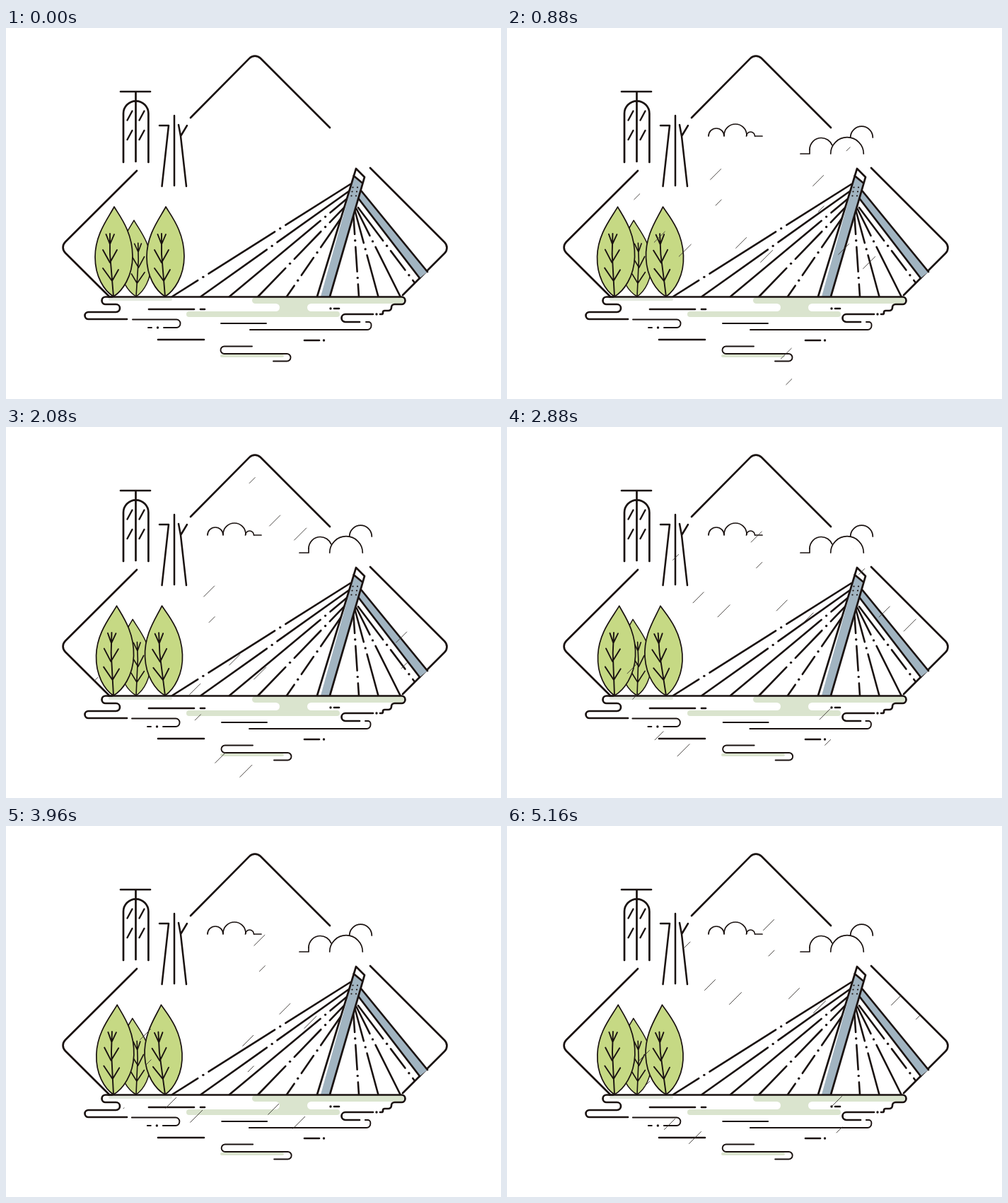
Recreate the animation shown at these times as an HTML page with a canvas. Size 700 by 525 pixels, loop 5200 ms.

```html
<!DOCTYPE html>
<html lang="en">
<head>
<meta charset="utf-8">
<title>Bridge in the rain</title>
<style>
html, body { margin: 0; width: 100%; height: 100%; overflow: hidden; background: #fff; }
canvas { display: block; width: 700px; height: 525px; }
</style>
</head>
<body>
<canvas id="stage" width="700" height="525"></canvas>
<script>
const ctx = document.getElementById('stage').getContext('2d');
const LOOP = 5200, STEP = 40, RAIN = 2400, SWAY = 1200, RAIN_START = 430;
const INK = '#1a1210', LEAF = '#c6d984', PALE = '#dae4ce', BLUE = '#a1b4c1';
const THICK = 2.7, THIN = 1.9;

function stroke(d, width = THICK, color = INK) {
  ctx.strokeStyle = color;
  ctx.lineWidth = width;
  ctx.stroke(new Path2D(d));
}

function fill(d, color) {
  ctx.fillStyle = color;
  ctx.fill(new Path2D(d));
}

function bar(x, y, w, h, color, r = h / 2) {
  ctx.fillStyle = color;
  ctx.beginPath();
  ctx.roundRect(x, y, w, h, r);
  ctx.fill();
}

function dot(x, y, r = 1.7) {
  ctx.fillStyle = INK;
  ctx.beginPath();
  ctx.arc(x, y, r, 0, Math.PI * 2);
  ctx.fill();
}

// Polyline through 'x,y x,y ...' with rounded corners
function pipe(points, width = THICK, radius = 5.4) {
  const p = points.split(' ').map(s => s.split(',').map(Number));
  const half = (a, b) => Math.hypot(a[0] - b[0], a[1] - b[1]) / 2;
  ctx.strokeStyle = INK;
  ctx.lineWidth = width;
  ctx.beginPath();
  ctx.moveTo(...p[0]);
  for (let i = 1; i < p.length - 1; i++) {
    const r = Math.min(radius, half(p[i - 1], p[i]), half(p[i], p[i + 1]));
    ctx.arcTo(...p[i], ...p[i + 1], r);
  }
  ctx.lineTo(...p[p.length - 1]);
  ctx.stroke();
}

function shifted(dx, draw) {
  ctx.save();
  ctx.translate(dx, 0);
  draw();
  ctx.restore();
}

function frame() {
  pipe('261,127 352,35 458,141', THICK, 11);
  pipe('185,202 76,310.5 146,380', THICK, 11);
  pipe('515,198 628,311 561,378', THICK, 11);
}

function towers() {
  stroke('M162 90H204M183.5 90V189');
  stroke('M166 190V121A17.7 17.7 0 0 1 201.4 121V190');
  for (const x of [175, 192])
    for (const y of [124, 151.5]) stroke(`M${x + 3.5} ${y - 6.5}l-7 13`, 2.4);
  stroke('M217 138H230L220.5 224M238 124V223M244 137L247 153L255 224M256 138L247 153', 2.5);
}

function water(s) {
  bar(380, 386, 54, 18, PALE, 0);
  bar(300, 390, 87, 11, '#fff');
  bar(426, 390, 110, 11, '#fff');
  bar(348, 381, 215, 9, PALE);
  bar(255, 401, 217, 8, PALE);
  bar(145, 382, 90, 4, '#e3e8de');
  bar(303, 462, 90, 4, PALE);

  pipe('150,380.5 135.5,380.5 135.5,391 161,391 161,402 111.5,402 111.5,412 171,412');
  pipe('145,380.5 564.5,380.5 564.5,391 545,391 545,400 533,400 533,405 529,405');
  pipe('519,405 474.5,405 474.5,416 500,416');
  stroke('M202 398H266M275 398H281M215 441H280M422 442H443M464 397H471');
  dot(524, 405);
  dot(459, 397);
  dot(449.5, 442);

  shifted(s * 1.8, () => {
    stroke('M304 418H368', THIN);
    pipe('348,450.5 303.5,450.5 303.5,461 402.5,461 402.5,471.5 378,471.5', THIN);
  });
  shifted(-s * 1.8, () => {
    pipe('179,412.5 246.5,412.5 246.5,424 223,424', THIN);
    pipe('509,416 516.5,416 516.5,427 345,427', THIN);
    stroke('M201 424H206', THIN);
    dot(214.5, 424);
  });
}

// Each gap in a cable holds one dot; gaps are shares of its length
function cable(x0, y0, x1, y1, gaps) {
  const x = k => x0 + (x1 - x0) * k, y = k => y0 + (y1 - y0) * k;
  const pad = 9 / Math.hypot(x1 - x0, y1 - y0);
  let from = 0;
  for (const g of [...gaps, 1 + pad]) {
    stroke(`M${x(from)} ${y(from)}L${x(g - pad)} ${y(g - pad)}`, 2.6);
    if (g < 1) dot(x(g), y(g));
    from = g + pad;
  }
}

function bridge() {
  ctx.save();
  ctx.clip(new Path2D('M0 0H939L414 525H0Z'));
  [[.394, .826], [.52], [.19], [.24, .64], [.48, .81]].forEach((gaps, i) =>
    cable(487 - 1.8 * i, 221 + 9.8 * i, 235 + 40.5 * i, 380, gaps));
  [[.34, .78], [.45], [.37], [.43, .76]].forEach((gaps, i) =>
    cable(491 + 2.3 * i, 260 - 2 * i, 499 + 25.5 * i + 1.9 * i * i, 380, gaps));
  ctx.restore();

  fill('M502 230L596 345L585 354L499 242Z', BLUE);
  stroke('M502 230L596 345M499 242L585 354');

  fill('M495 199L507 211L458 380H440Z', '#fff');
  fill('M492 211L503 220L458 380H445Z', BLUE);
  stroke('M440 380L495 199L507 211L458 380M491.5 209L503.5 219');
  for (let i = 0; i < 6; i++) dot(490.5 + i % 2 * 6.5 - (i >> 1), 225.5 + (i >> 1) * 6, 1.1);
}

const LEAF_SHAPE = 'M0 0C-13 -8 -26 -28 -26 -56C-26 -88 -8 -110 1 -127C8 -115 27 -92 27 -57C27 -29 13 -8 0 0Z';
const LEAF_VEINS = 'M0 0L-5 -60V-89M-10.5 -88L-5 -74L1 -88M-15 -66L-5 -48L5 -66M-15 -40L-2 -22L7 -38';

function leaf(x, angle, sx, sy) {
  ctx.save();
  ctx.translate(x, 380);
  ctx.rotate(angle);
  ctx.scale(sx, sy);
  fill(LEAF_SHAPE, LEAF);
  stroke(LEAF_SHAPE, 1.7);
  stroke(LEAF_VEINS, THIN);
  ctx.restore();
}

function leaves(s) {
  leaf(184, -.02 - s * .031, -.85, .85);
  leaf(152, s * .05, 1, 1);
  leaf(225, -s * .079, 1, 1);
}

function puff(x, y, r, end = 0) {
  ctx.beginPath();
  ctx.arc(x, y, r, Math.PI, end);
  ctx.stroke();
}

function sky(t) {
  const grow = Math.min(1, t / 440);
  if (!grow) return;
  if (grow < 1) ctx.setLineDash([grow * 75, 200]);
  stroke('M351 153H361M415 178H428V172', 1.7);
  puff(296, 153, 11);
  puff(323, 152, 16);
  puff(344.5, 153, 6);
  puff(444.5, 172, 16.5, -.4);
  puff(481, 178, 23.3);
  puff(501.5, 155, 15.8);
  ctx.setLineDash([]);
}

// One gust is four drops [dx, dy, half length]; gusts give its place and drift
const gust = [[0, 0, 7.5], [4, 40, 4], [36, 97, 7.5], [72, 116, 8.5]];
const gusts = [[370, 140, .144], [515, 149, .144], [251, 128, .137], [194, 325, .137], [466, 390, .137]];

function rain(t) {
  if (t < RAIN_START) return;
  ctx.save();
  ctx.clip(new Path2D('M76 311L352 35L632 315L422 525H291Z'));
  ctx.strokeStyle = '#3c3734';
  ctx.lineWidth = .9;
  ctx.beginPath();
  for (const [x0, y0, drift] of gusts) {
    for (let turn = -1; turn < 2; turn++) {
      const age = t % RAIN - 360 + turn * RAIN;
      for (const [dx, dy, h] of gust) {
        const x = x0 + dx - drift * age, y = y0 + dy + (.273 - drift) * age;
        ctx.moveTo(x - h, y + h);
        ctx.lineTo(x + h, y - h);
      }
    }
  }
  ctx.stroke();
  ctx.restore();
}

function draw(t) {
  const s = (1 - Math.cos(t / SWAY * Math.PI * 2)) / 2;
  ctx.fillStyle = '#fff';
  ctx.fillRect(0, 0, 700, 525);
  ctx.lineCap = 'round';
  ctx.lineJoin = 'round';
  frame();
  towers();
  sky(t);
  bridge();
  water(s);
  leaves(s);
  rain(t);
}

const start = performance.now();
function tick() {
  const t = (performance.now() - start) % LOOP;
  draw(Math.floor(t / STEP) * STEP);
  requestAnimationFrame(tick);
}
tick();
</script>
</body>
</html>
```
